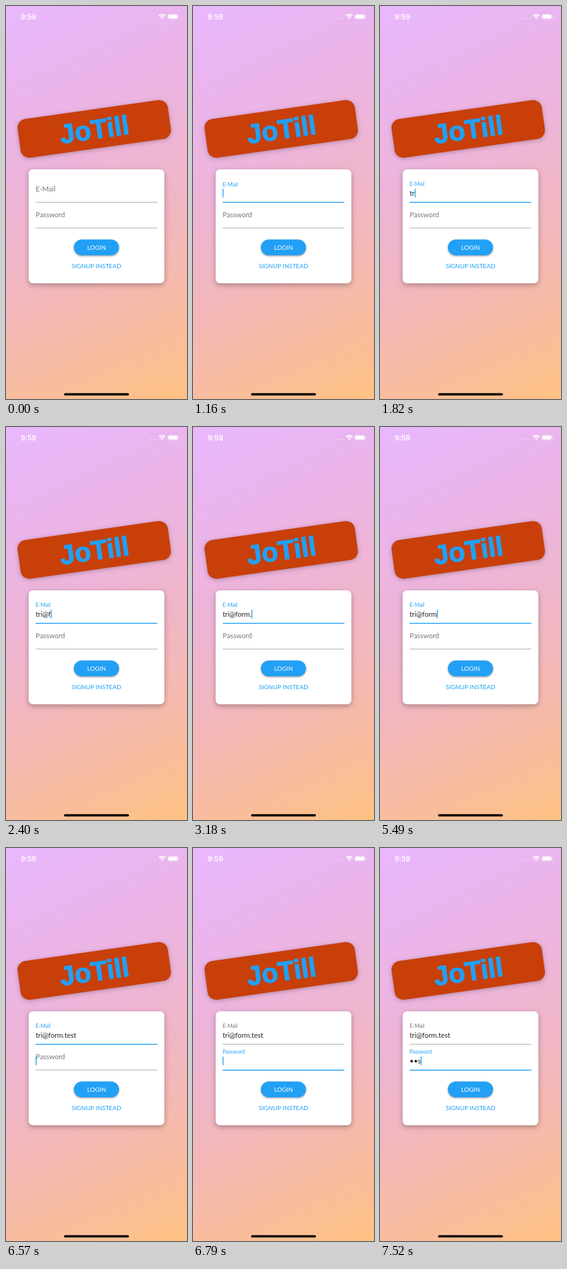
Animation, 296 px wide and 640 px high, one loop 8000 ms. Source, as an HTML page with a canvas:

```html
<!DOCTYPE html>
<html lang="en">
<head>
<meta charset="utf-8">
<title>Login screen</title>
<style>
  html, body { margin: 0; width: 100%; height: 100%; overflow: hidden; }
  canvas { display: block; width: 100vw; height: 100vh; }
</style>
</head>
<body>
<canvas id="stage"></canvas>
<script>
const W = 296, H = 640, LOOP = 8000;
const BLUE = [34, 160, 245], GREY = [117, 117, 117], LINE = [150, 150, 150];
const canvas = document.getElementById('stage');
const ctx = canvas.getContext('2d');
const LEFT = 49, RIGHT = 248;

const address = 'tri@form.test';
// Each entry is [start time, value]; the value holds until the next entry.
const typed = [
  [0, ''], [1700, address.slice(0, 1)], [1820, address.slice(0, 2)],
  [2010, address.slice(0, 3)], [2130, address.slice(0, 4)],
  [2400, address.slice(0, 5)], [2710, address.slice(0, 6)],
  [3030, address.slice(0, 7)], [3180, address.slice(0, 9)],
  [3600, 'tri@form.c'], [4140, 'tri@form.co'], [4410, 'tri@form.c'],
  [4570, address.slice(0, 9)], [4920, address.slice(0, 8)],
  [5090, 'tri@form,'], [5490, address.slice(0, 8)],
  [5670, address.slice(0, 9)], [5790, address.slice(0, 10)],
  [6130, address.slice(0, 11)], [6240, address.slice(0, 12)], [6350, address]
];
const secret = [[0, ''], [7520, '••s']];
const emailFloat = [[0, 0], [1040, 0.5], [1150, 0.95], [1270, 1]];
const passFloat = [[0, 0], [6680, 0.6], [6790, 1]];

function at(track, t) {
  let value = track[0][1];
  for (const [start, v] of track) if (t >= start) value = v;
  return value;
}

const lerp = (a, b, p) => a + (b - a) * p;
const mix = (a, b, p) => `rgb(${a.map((v, i) => Math.round(lerp(v, b[i], p)))})`;
const lato = size => `${size}px Lato, sans-serif`;

function text(str, x, y, font, color, align = 'left') {
  ctx.font = font;
  ctx.fillStyle = color;
  ctx.textAlign = align;
  ctx.fillText(str, x, y);
}

function box(x, y, w, h, r, color) {
  ctx.fillStyle = color;
  ctx.beginPath();
  ctx.roundRect(x, y, w, h, r);
  ctx.fill();
}

function shadowBox(x, y, w, h, r, color, blur, dy, alpha) {
  ctx.save();
  const scale = canvas.width / W;
  ctx.shadowColor = `rgba(0,0,0,${alpha})`;
  ctx.shadowBlur = blur * scale;
  ctx.shadowOffsetY = dy * scale;
  box(x, y, w, h, r, color);
  ctx.restore();
}

function background() {
  ctx.fillStyle = '#fafafa';
  ctx.fillRect(0, 0, W, H);
  const g = ctx.createLinearGradient(0, 0, W, H);
  g.addColorStop(0, 'rgba(215,117,255,0.5)');
  g.addColorStop(1, 'rgba(255,188,117,0.9)');
  ctx.fillStyle = g;
  ctx.fillRect(0, 0, W, H);
}

function statusBar() {
  text('9:59', 24, 21.5, '600 11.5px Inter, sans-serif', '#fff');
  for (let i = 0; i < 4; i++) box(233.5 + i * 3.6, 19.5, 1.6, 1.6, 0.8, 'rgba(255,255,255,0.6)');

  ctx.strokeStyle = '#fff';
  ctx.lineWidth = 1.7;
  for (const r of [7.4, 4.7]) {
    ctx.beginPath();
    ctx.arc(255.5, 21.2, r, -Math.PI * 0.75, -Math.PI * 0.25);
    ctx.stroke();
  }
  ctx.fillStyle = '#fff';
  ctx.beginPath();
  ctx.moveTo(255.5, 21.4);
  ctx.arc(255.5, 21.2, 2.7, -Math.PI * 0.75, -Math.PI * 0.25);
  ctx.fill();

  ctx.strokeStyle = 'rgba(255,255,255,0.5)';
  ctx.lineWidth = 0.7;
  ctx.beginPath();
  ctx.roundRect(264.4, 13.3, 17, 8, 2.4);
  ctx.stroke();
  box(265.4, 14.3, 15, 6, 1.5, '#fff');
  box(282.3, 15.9, 1, 2.8, 0.5, 'rgba(255,255,255,0.55)');
}

function banner() {
  ctx.save();
  ctx.translate(144.3, 200.2);
  ctx.rotate(-8 * Math.PI / 180);
  shadowBox(-124.1, -31.9, 248.2, 63.8, 14.3, '#c83f0a', 7.2, 1.5, 0.26);
  text('JoTill', 0, 16.2, 'bold 44px "Liberation Sans", Arial, sans-serif', mix(BLUE, BLUE, 0), 'center');
  ctx.strokeStyle = mix(BLUE, BLUE, 0);
  ctx.lineWidth = 1.2;
  ctx.lineJoin = 'round';
  ctx.strokeText('JoTill', 0, 16.2);
  ctx.restore();
}

// float: label raised (0..1), focus: highlight strength (0..1).
function field(y, label, value, float, focus, cursor) {
  const size = 11.44 * lerp(1, 0.75, float);
  text(label, LEFT - 0.5, y + lerp(-17.7, -26.6, float), lato(size), mix(GREY, BLUE, focus));
  const thick = lerp(0.8, 1.5, focus);
  ctx.fillStyle = mix(LINE, BLUE, focus);
  ctx.fillRect(LEFT - 0.5, y - thick / 2, RIGHT - LEFT, thick);
  text(value, LEFT - 0.5, y - 10.8, lato(11.44), 'rgba(0,0,0,0.87)');
  if (cursor) {
    const x = LEFT - 0.5 + ctx.measureText(value).width;
    box(x, y - 22.3, 1.4, 14.6, 0.7, mix(BLUE, BLUE, 0));
  }
}

function card(t) {
  shadowBox(37, 266, 222, 185.6, 7.2, '#fff', 8, 3, 0.3);
  const raised = at(emailFloat, t), moved = at(passFloat, t);
  field(319.7, 'E-Mail', at(typed, t), raised, raised * (1 - moved), t >= 930 && t < 6570);
  field(361.7, 'Password', at(secret, t), moved, moved, t >= 6570);

  const blue = mix(BLUE, BLUE, 0);
  shadowBox(111, 380.3, 73.8, 25.8, 12.9, blue, 3, 1.4, 0.36);
  text('LOGIN', 148, 397, lato(10), '#fff', 'center');
  text('SIGNUP INSTEAD', 148, 427, lato(10), blue, 'center');
}

function draw(t) {
  background();
  statusBar();
  banner();
  card(t);
  box(95, 630.6, 106, 3.7, 1.85, '#000');
}

function resize() {
  const dpr = window.devicePixelRatio || 1;
  canvas.width = Math.round(innerWidth * dpr);
  canvas.height = Math.round(innerHeight * dpr);
  ctx.setTransform(canvas.width / W, 0, 0, canvas.height / H, 0, 0);
}

resize();
addEventListener('resize', resize);
const begin = performance.now();
function tick() {
  draw((performance.now() - begin) % LOOP);
  requestAnimationFrame(tick);
}
tick();
</script>
</body>
</html>
```
